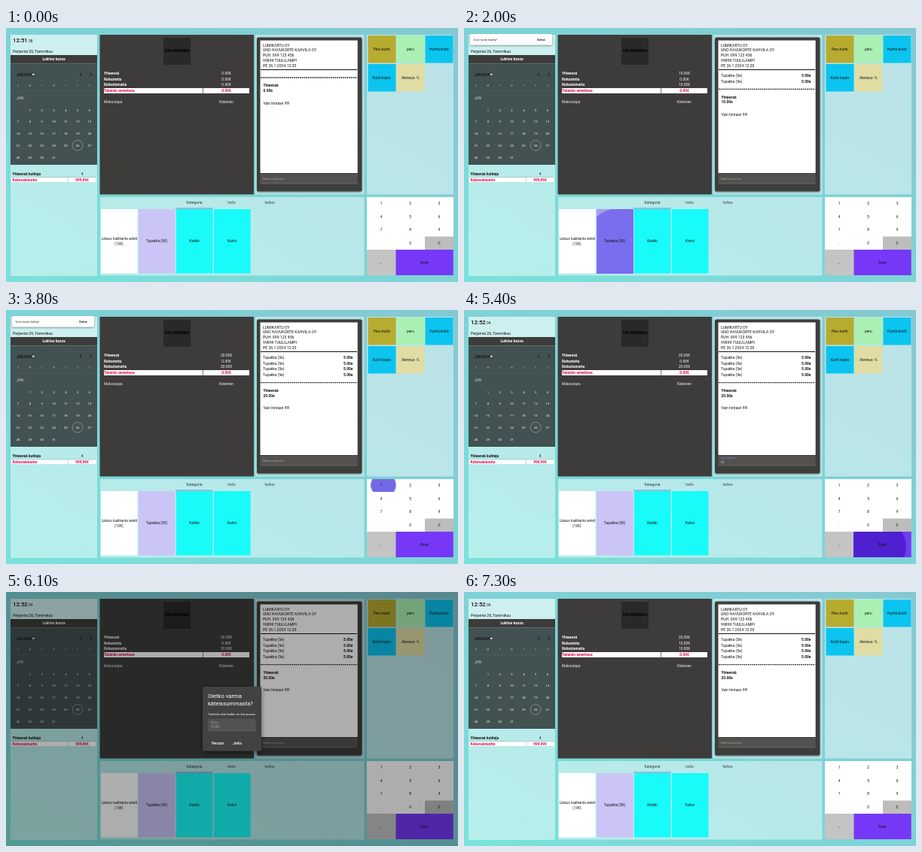
An HTML page that plays this animation: 600 by 338 pixels, repeating every 8 s.

```html
<!DOCTYPE html>
<html lang="fi">
<head>
<meta charset="utf-8">
<title>Kassa</title>
<style>
html, body { margin: 0; width: 100%; height: 100%; overflow: hidden; }
svg { display: block; width: 600px; height: 338px; font-family: Roboto, sans-serif; }
.ripple, #snack, #backdrop, #dialog, #hover {
  animation: 8s linear infinite; transform-box: fill-box; transform-origin: center;
}
.ripple { animation-name: ripple; }
#snack { animation-name: snack; }
#backdrop { animation-name: backdrop; }
#dialog { animation-name: dialog; }
#hover { animation-name: hover; }
@keyframes ripple {
  0% { transform: scale(0); opacity: 1; animation-timing-function: cubic-bezier(0, 0, .2, 1); }
  2.4% { transform: scale(1); opacity: 1; }
  3.5%, 100% { transform: scale(1); opacity: 0; }
}
@keyframes snack {
  0%, 16.5% { transform: scale(.8); opacity: 0; animation-timing-function: cubic-bezier(0, 0, .2, 1); }
  18.4%, 58.8% { transform: none; opacity: 1; }
  60%, 100% { transform: none; opacity: 0; }
}
@keyframes backdrop {
  0%, 68.3% { opacity: 0; }
  69.9%, 84.4% { opacity: 1; }
  86.4%, 100% { opacity: 0; }
}
@keyframes dialog {
  0%, 68.3% { transform: scale(.8); opacity: 0; animation-timing-function: cubic-bezier(0, 0, .2, 1); }
  69.9%, 84.4% { transform: none; opacity: 1; }
  85.4%, 100% { transform: none; opacity: 0; }
}
@keyframes hover {
  0%, 78.7% { opacity: 0; }
  80%, 100% { opacity: 1; }
}
</style>
</head>
<body>
<svg id="stage" viewBox="0 0 600 338"></svg>
<script>
const NS = 'http://www.w3.org/2000/svg';
const stage = document.getElementById('stage');
const RED = '#dc0a50', DARK = '#3d3c3b', INK = '#111';

function el(tag, attrs, parent = stage) {
  const node = document.createElementNS(NS, tag);
  for (const k in attrs) node.setAttribute(k, attrs[k]);
  return parent.appendChild(node);
}
const rect = (x, y, x2, y2, fill, parent, more) =>
  el('rect', { x, y, width: x2 - x, height: y2 - y, fill, ...more }, parent);
const line = (d, stroke, width, parent, more) =>
  el('path', { d, stroke, 'stroke-width': width, fill: 'none', ...more }, parent);
function text(str, x, y, size = 4.9, fill = INK, weight = 400, anchor = 'start', parent = stage) {
  const node = el('text', { x, y, fill, 'font-size': size, 'font-weight': weight, 'text-anchor': anchor }, parent);
  node.textContent = str;
  return node;
}
const mid = (str, x, y, size, fill, weight, parent) => text(str, x, y, size, fill, weight, 'middle', parent);

const defs = el('defs', {});
const sky = el('linearGradient', { id: 'sky', x1: 0, y1: 1, x2: 1, y2: 0 }, defs);
['#7ae2da', '#7dd3d6', '#84c9d2'].forEach((c, i) => el('stop', { offset: i / 2, 'stop-color': c }, sky));
function shadow(id, dy, stdDeviation) {
  const f = el('filter', { id, x: '-20%', y: '-20%', width: '140%', height: '150%' }, defs);
  el('feDropShadow', { dx: 0, dy, stdDeviation, 'flood-opacity': .45 }, f);
}
shadow('low', 1, 1.2);
shadow('high', 2.5, 3);

let clips = 0;
function ripples(x, y, x2, y2, cx, cy, r, fill, times) {
  const id = 'clip' + clips++;
  rect(x, y, x2, y2, '#000', el('clipPath', { id }, defs));
  const g = el('g', { 'clip-path': `url(#${id})` });
  for (const at of times) {
    const c = el('circle', { cx, cy, r, fill, class: 'ripple' }, g);
    c.style.animationDelay = `${at - 8000}ms`;
  }
}

rect(0, 0, 600, 338, 'url(#sky)');
const glass = (x, y, x2, y2) => rect(x, y, x2, y2, '#fff', stage, { opacity: .45, rx: 1 });
glass(6, 9, 121, 330);
glass(125, 225, 475.5, 329.5);
glass(331, 9, 475.5, 221.5);
glass(479, 9, 594, 221.5);

// Sidebar
rect(6, 9, 121, 36, '#fff', stage, { opacity: .3 });
const clock = text('', 9, 18.8, 7.8, INK, 500);
const secs = text('', 30, 18.8, 4.9);
text('Perjantai 26, Tammikuu', 9, 32.8, 5.1);
rect(6, 36, 121, 47.5, DARK);
mid('Lukitse kassa', 63.5, 43.4, 4.9, '#fff', 700);
rect(6, 47.5, 121, 182, '#425152');
text('JAN 2024', 14, 63.6, 4.5, '#0c0c0c', 500);
el('path', { d: 'M34.3 61h4l-2 2z', fill: '#fff' });
line('M100 59.8l-2 2.2 2 2.2M111.5 59.8l2 2.2-2 2.2', '#111', .9);
const dayX = col => 16 + col * 15.83;
[...'SMTWTFS'].forEach((d, i) => mid(d, dayX(i), 77.6, 3.1, '#b4bcbc'));
line('M6 83.5H121', '#536061', .5);
text('JAN', 14, 94.6, 4.7, '#dde2e2');
for (let d = 1; d <= 31; d++)
  mid(d, dayX(d % 7), 110.5 + Math.floor(d / 7) * 15.75, 4.2, '#fff');
el('circle', { cx: 95, cy: 156.2, r: 6.9, fill: 'none', stroke: '#a3afaf', 'stroke-width': .6 });
text('Yhteensä kuitteja', 8.5, 196, 4.8, INK, 700);
mid('4', 101, 196, 4.8);
rect(7, 199, 119.5, 205, '#fff');
line('M7 198.6H119.5M82.5 199V205', '#7c9c9b', .4);
text('Kokonaistuotto', 8.5, 204, 4.8, RED, 700);
mid('999,99€', 101, 204, 4.8, RED, 700);

// Payment summary
rect(124.5, 9, 329, 221.5, DARK, stage, { rx: 1 });
rect(209, 13, 245, 49, '#2a2929');
mid('VELMORINA', 227, 32.4, 5.9, '#000', 700);
rect(130, 80, 323, 87, '#fff');
line('M261.5 80V87', '#222', .6);
const sums = ['Yhteensä', 'Rahastettu', 'Rahastamatta', 'Takaisin annettava'].map((label, i) => {
  const y = 62.4 + i * 7.45, last = i === 3;
  text(label, 130, y, 4.8, last ? RED : '#fff', 700);
  return mid('0.00€', 292.5, y, 4.9, last ? RED : '#fff', last ? 700 : 400);
});
text('Maksutapa', 130, 99.6, 4.9, '#f0f0f0');
mid('Käteinen', 292.5, 99.6, 4.9, '#f0f0f0');

// Receipt
rect(333, 12.5, 472.5, 217.5, DARK, stage, { rx: 2, filter: 'url(#low)' });
rect(337.5, 16.5, 466.7, 193, '#fff');
['LUMIKARTU OY', 'UNO HAVUKORTE KAHVILA OY', 'PUH. 099 123 456', '99899 TUULILAMPI', 'PE 26.1.2024 12:20']
  .forEach((s, i) => text(s, 341, 24.6 + i * 6.85, 5.15));
line('M338 55.5H466', '#111', 1);
const rows = [0, 1, 2, 3].map(i => {
  const g = el('g', {}), y = 65 + i * 7.6;
  text('Tupakka (5e)', 341, y, 4.9, INK, 400, 'start', g);
  text('5.00e', 460.5, y, 4.9, INK, 700, 'end', g);
  return g;
});
const foot = el('g', {});
line('M338 66H466', '#111', 1.3, foot, { 'stroke-dasharray': '1.6 1' });
text('Yhteensä', 341.5, 78.4, 4.8, INK, 700, 'start', foot);
const total = text('', 341.5, 85, 4.8, INK, 700, 'start', foot);
text('Vain hintaan 99!', 341.5, 101.6, 4.9, INK, 400, 'start', foot);
rect(337.5, 194, 466.7, 207, '#535251');
line('M337.5 207H466.7', '#85817f', .5);
const hint = text('Valitse toiminto', 340.5, 201.8, 4, '#aaa7a5');
const tag = text('Valitse toiminto', 340.5, 198.3, 2.8, '#8f7bea');
const typed = text('', 340.5, 204, 4.1, '#eee');

// Action tiles
[['Peru kuitti', '#b7ab30'], ['peru', '#a9f0b2'], ['Hyvitä kuitti', '#0bc4ef'],
 ['Kuitti kopio', '#0bc4ef'], ['Alennus -%', '#e0dca4']].forEach(([label, fill], i) => {
  const x = 480.5 + i % 3 * 38, y = 10 + Math.floor(i / 3) * 38;
  rect(x, y, x + 37, y + 36.5, fill);
  mid(label, x + 18.3, y + 20, 4.9);
});

// Products
mid('Kategoria', 250, 234.2, 4.9, '#333');
mid('hello', 299.5, 234.2, 4.9, '#444');
mid('helloo', 350, 234.2, 4.9, '#444');
line('M225 240H274.5', '#8b80c8', 1);
['#fff', '#cbc4f7', '#18fbf9', '#18fbf9']
  .forEach((fill, i) => rect(126 + i * 50, 241, 174.5 + i * 50, 326.5, fill));
ripples(176, 241, 224.5, 326.5, 210, 293, 62.7, '#7b6eee', [1200, 1760, 1900, 2300]);
mid('Lataus tuulikanta seteli', 150.3, 282, 4.6);
mid('(10€)', 150, 288.6, 4.8);
mid('Tupakka (5€)', 200, 285.3, 4.9);
mid('Karkki', 250, 285.3, 4.9);
mid('Kahvi', 300, 285.3, 4.9);

// Keypad
rect(479, 225, 594, 295, '#fff');
rect(556, 277.5, 594, 295, '#bdbdbd');
rect(479, 295, 517.5, 329, '#c5c4c4');
rect(517.5, 295, 593.7, 329, '#7638f6');
ripples(479, 225, 517.5, 242, 501, 233, 23, '#7468e6', [3730]);
ripples(517.5, 277.5, 556, 295, 537, 286, 21, '#7468e6', [4280]);
ripples(517.5, 295, 593.7, 329, 549.5, 315, 48, '#4e20cf', [5320]);
[...'123456789.0C'].forEach((k, i) => mid(k, 498 + i % 3 * 38.5, 235 + Math.floor(i / 3) * 17.6, 4.8));
mid('←', 498, 314, 4.8);
mid('Enter', 555.5, 314, 4.8);

// Snackbar
const snack = el('g', { id: 'snack' });
rect(8, 8, 117, 22.5, '#fdfdfd', snack, { rx: 1.6, filter: 'url(#low)' });
text('Uusi tuote lisätty!', 12.5, 17, 4.1, '#333', 400, 'start', snack);
text('Selvä', 97, 17, 4.4, INK, 500, 'start', snack);

// Confirmation dialog
rect(0, 0, 600, 338, 'rgba(0,0,0,.32)', stage, { id: 'backdrop' });
const dialog = el('g', { id: 'dialog' });
const say = (s, x, y, size, fill = '#fff', weight) => text(s, x, y, size, fill, weight, 'start', dialog);
rect(261, 126, 339, 211.5, '#424242', dialog, { rx: 1.5, filter: 'url(#high)' });
say('Oletko varma', 268, 141.2, 7.6);
say('käteissummasta?', 268, 151.2, 7.6);
say('Tarkista että kaikki on kunnossa', 268, 163.6, 4.4);
rect(268, 168.5, 331.5, 184.8, '#525252', dialog, { rx: 1 });
line('M268 184.8H331.5', '#777', .5, dialog);
say('Määrä', 271.5, 174.8, 3.7, '#9a9a9a');
say('10.00', 271.5, 181, 4.6, '#a5a5a5');
rect(298, 195, 317.5, 207.5, '#5f5f5f', dialog, { id: 'hover', rx: 1 });
mid('Peruuta', 281, 203, 4.6, '#fff', 500, dialog);
mid('Jatka', 307, 203, 4.6, '#fff', 500, dialog);

const adds = [1320, 1860, 2040, 2420];
const show = (node, on) => node.setAttribute('visibility', on ? 'visible' : 'hidden');
const put = (node, s) => { if (node.textContent !== s) node.textContent = s; };
const timer = snack.getAnimations()[0];

function update(t) {
  const s = 58 + Math.floor((t + 800) / 1000);
  put(clock, s < 60 ? '12:51' : '12:52');
  put(secs, String(s % 60).padStart(2, '0'));

  const count = adds.filter(a => a <= t).length;
  const due = count * 5, paid = t >= 6780 ? 10 : 0;
  [due, paid, due - paid, 0].forEach((v, i) => put(sums[i], v.toFixed(2) + '€'));
  put(total, due.toFixed(2) + 'e');
  rows.forEach((row, i) => show(row, i < count));
  foot.setAttribute('transform', `translate(0 ${count * 7.65})`);

  const value = t < 3850 || t >= 5500 ? '' : t < 4400 ? '1' : '10';
  put(typed, value);
  show(tag, value);
  show(hint, !value);
}
function frame() {
  update((timer.currentTime || 0) % 8000);
  requestAnimationFrame(frame);
}
frame();
</script>
</body>
</html>
```
